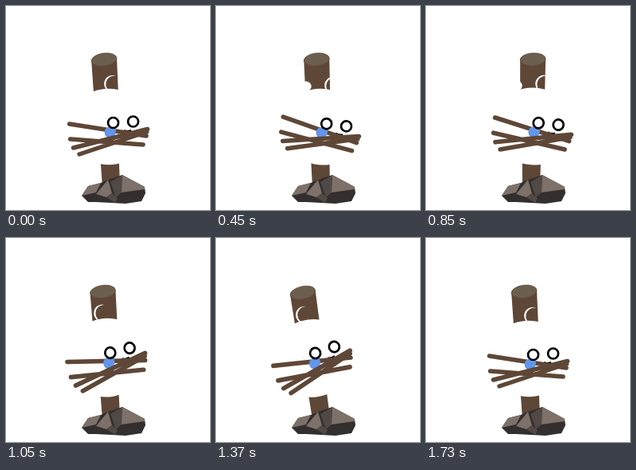
These frames come from a looping animation (256 px wide and 256 px high, 1850 ms). An HTML page:

```html
<!DOCTYPE html>
<html lang="en">
<head>
<meta charset="utf-8">
<title>Tied to the stake</title>
<style>
  html, body { margin: 0; width: 100%; height: 100%; overflow: hidden; background: #fff; }
  svg { display: block; width: 100vw; height: 100vh; }
  .wood { fill: #5e4737; }
  .rope { fill: none; stroke: #5e4737; stroke-width: 5.5; stroke-linecap: round; }
  .blue { fill: #6196ea; }
  .eye { fill: #fff; stroke: #000; stroke-width: 2.7; }
  .light { fill: #7d7169; }
  .mid { fill: #514945; }
  .dark { fill: #322f2e; }
</style>
</head>
<body>
<svg viewBox="0 0 256 256">
  <defs>
    <path id="drop" d="M10 1C9 -3 3 -5 -4 -5C-12 -5 -12 4 -4 5C2 5.5 10 5 10 1Z"/>
  </defs>
  <g id="pole">
    <path class="wood" d="M116 67H148L147.5 105L143.5 199L143 230H121L120.5 199L116.5 105Z"/>
    <ellipse cx="132" cy="67" rx="16" ry="8" fill="#6d5f50" stroke="#5e4737" stroke-width=".8" transform="rotate(-4 132 67)"/>
  </g>
  <g id="drops" class="blue"></g>
  <g id="body">
    <g fill="#fff">
      <path d="M138 88A10.5 10.5 0 1 0 133 108A10 10 0 0 1 138 88Z"/>
      <circle cx="101" cy="105" r="6.3"/>
      <ellipse cx="129" cy="151.5" rx="52" ry="47.7"/>
    </g>
    <path d="M117 146L122 153" stroke="#ececec" fill="none"/>
    <path d="M148 156Q152 158 157 156" stroke="#000" stroke-width="2" fill="none"/>
    <path class="rope" d="M79.5 148L176 163"/>
    <path class="blue" d="M136 150C139 154 139 165.500 130.5 165.500C121.500 165.500 121.500 152 130 152Z"/>
    <path class="rope" d="M80.5 167L172 174M84.500 178L177.500 154.500M92 186L176.500 158"/>
    <circle class="eye" cx="134.5" cy="146.5" r="6.5"/>
    <circle class="eye" cx="159.5" cy="145" r="6.5"/>
  </g>
  <g>
    <path class="dark" d="M95 238L103 226L119 222L128 218L146 212L174 227L175 235L170 245L150 248L113 246L103 246Z"/>
    <path class="light" d="M103 226L119 222L113 234L95 238Z"/>
    <path class="mid" d="M146 212L131 221L138 240L145 234Z"/>
    <path class="light" d="M146 212L174 227V230L145 234Z"/>
    <path class="light" d="M128 218L113 236L126 240L133 235Z"/>
    <path class="mid" d="M126 240L133 235L140 241L137 247Z"/>
  </g>
</svg>
<script>
const LOOP = 1850, START = 250, END = 1730, STEP = 40;
const $ = id => document.getElementById(id);
const place = (el, transform) => el.setAttribute("transform", transform);
const mix = (a, b, u) => a + (b - a) * u;
const ramp = (t, from, to) => Math.min(1, Math.max(0, (t - from) / (to - from)));
const ease = u => (1 - Math.cos(Math.PI * u)) / 2;

// Eases from one [time, value] stop to the next
const glide = (t, stops) => stops.reduce((v, [time, value], i) =>
  i ? mix(v, value, ease(ramp(t, stops[i - 1][0], time))) : value, 0);

const lean = t => glide(t, [[340, -3.2], [700, 2.1], [1350, -8.4], [END, -3.2]]);
const turn = t => glide(t, [[START - STEP, 0], [650, 18.5], [1230, -18.5], [END, 0]]);
const lift = t => glide(t, [[650, 0], [1100, 1], [END, 0]]);

// Each drop leaves the body, passes near and dries up at far
const sweat = [
  { near: [97, 98.5], far: [49.5, 113.5], angle: [58, 18], size: 1 },
  { near: [89, 112], far: [55, 129], angle: [20, -42], size: 0.8 },
  { near: [185, 130], far: [184, 107], angle: [130, 145], size: 0.75 },
  { near: [189.5, 141.5], far: [186, 119], angle: [190, 200], size: 0.63 }
];
const heart = [132, 152];

for (const drop of sweat) {
  drop.el = document.createElementNS("http://www.w3.org/2000/svg", "use");
  drop.el.setAttribute("href", "#drop");
  $("drops").append(drop.el);
}

function drawDrop({ el, near, far, angle, size }, t) {
  const hidden = 0.55 * (1 - ramp(t, 650, 850));
  const flight = ramp(t, 850, 1050);
  const [x, y] = near.map((n, i) => mix(mix(n, heart[i], hidden), far[i], flight));
  const scale = t > 650 ? size * (1 - ramp(t, 1050, 1210)) : 0;
  place(el, `translate(${x} ${y}) rotate(${mix(...angle, flight)}) scale(${scale})`);
}

function draw(now) {
  const ms = now % LOOP;
  const t = ms < START ? 0
    : Math.min(END, START + Math.floor((ms - START) / STEP) * STEP);

  const tilt = lean(t), up = lift(t);
  const x = 132.4 + 60 * Math.sin(tilt * Math.PI / 180);
  place($("pole"), `rotate(${tilt} 132 226)`);
  place($("body"), `translate(${x} ${163 - 1.2 * up}) rotate(${turn(t)})
    scale(1 ${1 + 0.035 * up}) translate(-129 -163)`);
  sweat.forEach(drop => drawDrop(drop, t));
}

const began = performance.now();
function tick() {
  draw(performance.now() - began);
  requestAnimationFrame(tick);
}
tick();
</script>
</body>
</html>
```
